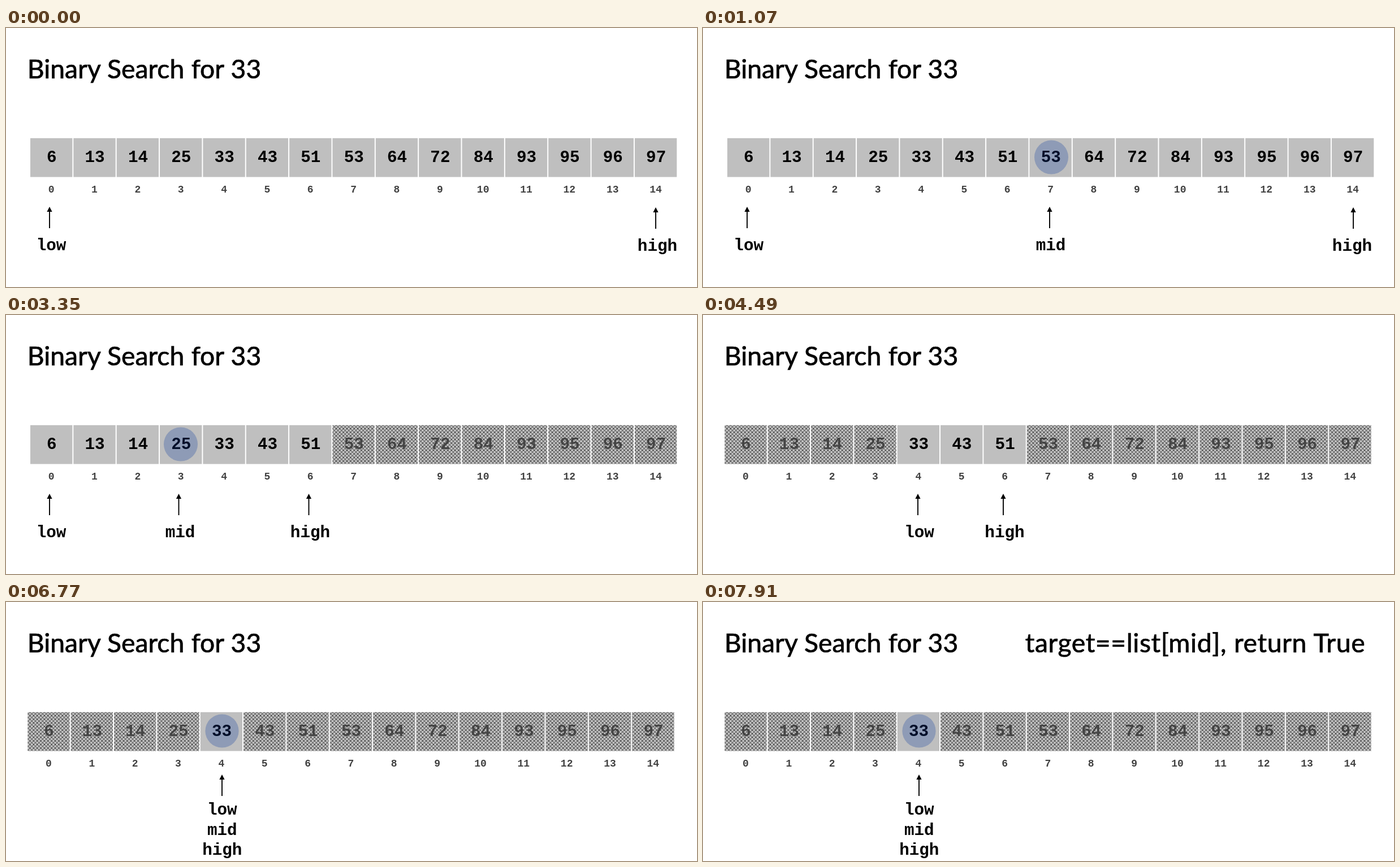
Animation of 1222x458 px, one loop 9050 ms. Source, as an HTML page:

```html
<!DOCTYPE html>
<html lang="en">
<head>
<meta charset="utf-8">
<title>Binary Search</title>
<style>
  html, body { margin: 0; width: 100%; height: 100%; overflow: hidden; background: #fff; }
  svg { display: block; width: 1222px; height: 458px; }
  text { text-anchor: middle; }
  .title { font: 46.3px Lato, Carlito, sans-serif; word-spacing: .5px; stroke: #000; stroke-width: .7px; }
  .result { letter-spacing: .6px; }
  .value, .label { font: bold 29.3px "Liberation Mono", monospace; }
  .index { font: bold 18px "Liberation Mono", monospace; fill: #404040; }
  .cell { fill: #bfbfbf; }
  .out .cell { fill: url(#hatch); }
  .out .value { fill: #454545; }
  .spot { fill: #0a3a9c; fill-opacity: .27; }
  .step { visibility: hidden; animation: show 9050ms step-end infinite; }
  .step:first-child { animation-name: first; }
  /* 1140 ms and 1070 ms of the loop */
  @keyframes show { 0% { visibility: visible } 12.5967% { visibility: hidden } }
  @keyframes first { 0% { visibility: visible } 11.8232% { visibility: hidden } }
</style>
</head>
<body>
<svg viewBox="0 0 1222 458">
  <defs>
    <pattern id="hatch" x="259" y="252" width="6.37" height="6.37" patternUnits="userSpaceOnUse" viewBox="0 0 8 8">
      <rect width="8" height="8" fill="#c4c4c4"/>
      <path d="M-1-1L9 9M9-1L-1 9" stroke="#161616" stroke-width="1.05"/>
    </pattern>
    <g id="arrow">
      <path d="M0 6V38" stroke="#000" stroke-width="1.9"/>
      <path d="M0 0L4.6 9H-4.6Z"/>
    </g>
  </defs>
  <text class="title" x="244.5" y="89">Binary Search for 33</text>
  <g id="steps"></g>
</svg>
<script>
const LOOP = 9050, FIRST = 1070, HOLD = 1140, PITCH = 76.35;
const values = [6, 13, 14, 25, 33, 43, 51, 53, 64, 72, 84, 93, 95, 96, 97];

const text = (cls, x, y, s) => `<text class="${cls}" x="${x}" y="${y}">${s}</text>`;
const arrow = (x, y = 316) => `<use href="#arrow" x="${x}" y="${y}"/>`;
const pointer = (name, x, tip, drop = 0) => text('label', x, 393 + drop, name) + arrow(tip, 316 + drop);
const spot = (x, y = 228.5, r = 30) => `<circle class="spot" cx="${x}" cy="${y}" r="${r}"/>`;

// Cells outside low..high are crossed out.
function list(left, low, high) {
  return values.map((v, i) => {
    const x = left + i * PITCH, mid = x + PITCH / 2;
    return `<g class="${i < low || i > high ? 'out' : 'in'}">
      <rect class="cell" x="${x + 1}" y="194.8" width="${PITCH - 2}" height="68.7"/>
      ${text('value', mid + .6, 237.3, v)}${text('index', mid, 291.3, i)}</g>`;
  }).join('');
}

const WIDE = 42, SHIFTED = 37.3;
const half = list(WIDE, 0, 6) + pointer('low', 80, 77) + pointer('high', 538, 535.5);
const pair = list(SHIFTED, 4, 6) + pointer('low', 382.5, 380) + pointer('high', 533.5, 531);
const found = list(SHIFTED, 4, 4) + spot(382, 228, 29.6) + arrow(382, 305) +
  ['low', 'mid', 'high'].map((s, i) => text('label', 382.3, 376 + i * 35.7, s)).join('');

const steps = [
  list(WIDE, 0, 14) + pointer('low', 80, 77) + pointer('high', 1152, 1149, 1),
  list(WIDE, 0, 14) + spot(616) + pointer('low', 80.7, 78) +
    pointer('mid', 615, 613) + pointer('high', 1148, 1150, 1),
  half,
  half + spot(309) + pointer('mid', 308, 305.5),
  pair,
  pair + spot(457.7) + pointer('mid', 457, 455),
  found,
  found + text('title result', 870.5, 89, 'target==list[mid], return True')
];

document.getElementById('steps').innerHTML = steps.map((s, i) => {
  const delay = i ? FIRST + (i - 1) * HOLD - LOOP : 0;
  return `<g class="step" style="animation-delay:${delay}ms">${s}</g>`;
}).join('');
</script>
</body>
</html>
```
